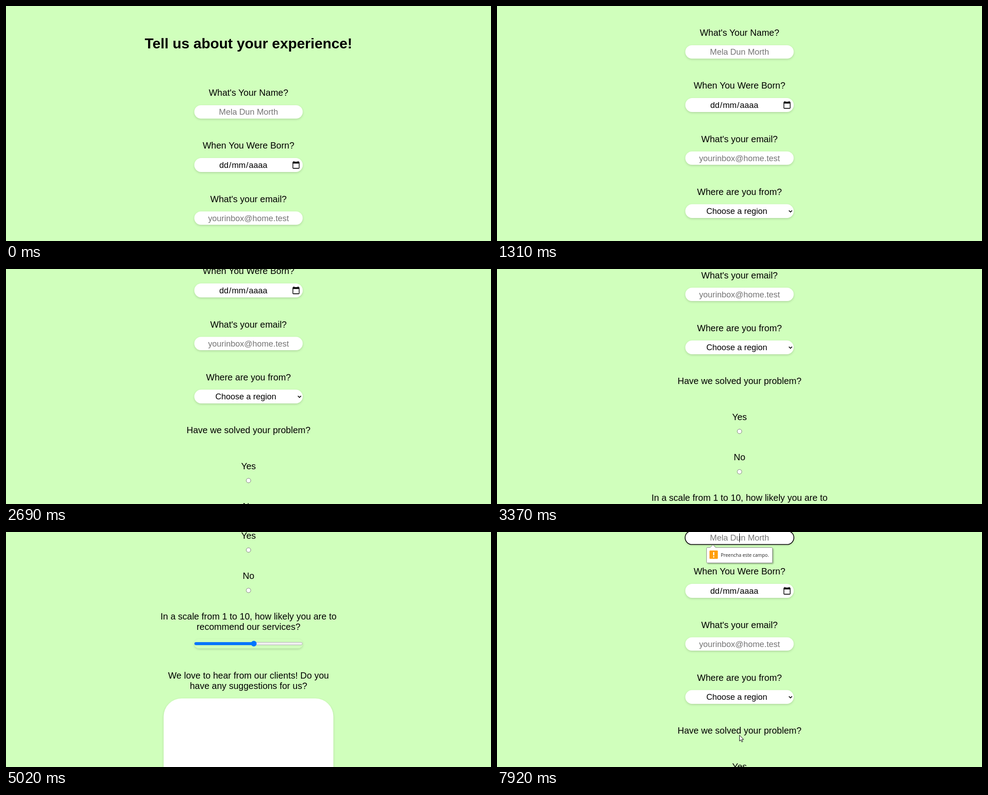
Recreate the animation shown at these times as an HTML page. Size 1075 px wide and 521 px high, loop 7.99 s.

```html
<!DOCTYPE html>
<html lang="en">
<head>
<meta charset="utf-8">
<title>Feedback form</title>
<style>
  html, body { margin: 0; width: 100%; height: 100%; overflow: hidden; background: #d0ffbc; }
  svg { display: block; width: 100vw; height: 100vh; }
  text { font-family: "Liberation Sans", Arial, sans-serif; text-anchor: middle; }
  .title { font-size: 32px; font-weight: bold; }
  .label { font-size: 20px; }
  .value { font-size: 18.4px; }
  .hint { fill: #757575; }
  .box { fill: #fff; filter: url(#shadow); }
  .button { fill: #efefef; }
  .hollow { fill: #d0ffbc; }
  .radio { fill: #fff; stroke: #767676; }
  .tip { font: 10.4px "Open Sans", "Noto Sans", sans-serif; text-anchor: start; fill: #222; }
</style>
</head>
<body>
<svg viewBox="0 0 1075 521">
  <defs>
    <filter id="shadow" x="-10%" y="-50%" width="120%" height="200%">
      <feDropShadow dx="0" dy="2" stdDeviation="2.5" flood-opacity=".16"/>
    </filter>
    <filter id="tipShadow">
      <feDropShadow dx="2" dy="2" stdDeviation="1.5" flood-opacity=".3"/>
    </filter>
  </defs>
  <g id="page">
    <g id="form"></g>

    <!-- calendar icon, select chevron -->
    <path transform="translate(633.6 343) scale(.767)" d="M20 3h-1V1h-2v2H7V1H5v2H4c-1.1 0-2 .9-2 2v16c0 1.1.9 2 2 2h16c1.1 0 2-.9 2-2V5c0-1.1-.9-2-2-2zm0 18H4V8h16v13z"/>
    <path d="M647 586.3l3.5 3.5 3.5-3.5" fill="none" stroke="#000" stroke-width="1.7"/>

    <!-- slider -->
    <rect x="418" y="978.5" width="239" height="6" rx="3" fill="#efefef" stroke="#b2b2b2"/>
    <path d="M421 981.5H549" stroke="#0075ff" stroke-width="6.6" stroke-linecap="round"/>
    <circle cx="549.3" cy="981.5" r="6.2" fill="#0075ff"/>

    <!-- resize grip -->
    <path d="M717.5 1317.5l7-7M721.5 1317.5l3-3" stroke="#777"/>

    <g id="focus">
      <rect x="417" y="219.5" width="241" height="30.2" rx="15.1" fill="none" stroke="#101010" stroke-width="1.8"/>
      <path d="M537.5 225v20" stroke="#000"/>
    </g>
    <g id="tooltip">
      <path d="M466 256.5h6.5l6-6 6 6h124q2 0 2 2v30q0 2-2 2h-142q-2 0-2-2v-30q0-2 2-2z" fill="#fff" stroke="#8a8a8a" filter="url(#tipShadow)"/>
      <rect x="471" y="263" width="18.5" height="18.5" rx="1.5" fill="#ff9f0a"/>
      <path d="M480.3 266.5v7.2M480.3 275.8v2.6" stroke="#fff" stroke-width="2.6"/>
      <text class="tip" x="496" y="277">Preencha este campo.</text>
    </g>
  </g>
  <path id="cursor" d="M.5.5V13.5L3.5 10.7 5.6 15.5 7.7 14.6 5.6 10H9.7Z" fill="#fff" stroke="#000"/>
</svg>
<script>
const LOOP = 7990, MID = 537.5, SUBMIT = 7640;
const $ = id => document.getElementById(id);

const text = (kind, y, content, x = MID) =>
  `<text class="${kind}" x="${x}" y="${y}">${content}</text>`;
const box = (y, h, kind = "", w = 240, r = h / 2) =>
  `<rect class="box ${kind}" x="${MID - w / 2}" y="${y}" width="${w}" height="${h}" rx="${r}"/>`;
const radio = (y, name) =>
  text("label", y, name) + `<circle class="radio" cx="${MID}" cy="${y + 25.5}" r="5"/>`;

$("form").innerHTML = [
  text("title", 93.5, "Tell us about your experience!"),
  text("label", 199, "What's Your Name?"),
  box(220, 29.6), text("value hint", 241, "Mela Dun Morth"),
  text("label", 316, "When You Were Born?"),
  box(337, 31),
  text("value", 359, 'dd<tspan dx="1">/</tspan><tspan dx="1">mm</tspan><tspan dx="1">/</tspan><tspan dx="1">aaaa</tspan>', 526),
  text("label", 434.5, "What's your email?"),
  box(455.5, 29.6), text("value hint", 476.5, "yourinbox@home.test"),
  text("label", 551.5, "Where are you from?"),
  box(572.5, 30.5), text("value", 594, "Choose a region", 531.5),
  text("label", 669, "Have we solved your problem?"),
  radio(748.5, "Yes"),
  radio(838, "No"),
  text("label", 927.5, "In a scale from 1 to 10, how likely you are to"),
  text("label", 950.5, "recommend our services?"),
  box(971.5, 20.5, "hollow"),
  text("label", 1059, "We love to hear from our clients! Do you"),
  text("label", 1082.3, "have any suggestions for us?"),
  box(1103, 215.8, "", 376, 40),
  box(1358.7, 29.8, "button"), text("value", 1380, "Send")
].join("");

// Smooth monotone curve through [position, value] points.
function curve(points) {
  const slopes = points.slice(1).map(([x, y], i) => (y - points[i][1]) / (x - points[i][0]));
  const tangent = i => {
    const a = slopes[i - 1] ?? slopes[i], b = slopes[i] ?? a;
    return a * b > 0 ? 2 * a * b / (a + b) : 0;
  };
  return x => {
    if (x <= points[0][0]) return points[0][1];
    const i = points.findIndex(p => p[0] >= x) - 1;
    if (i < 0) return points.at(-1)[1];
    const [x0, y0] = points[i], [x1, y1] = points[i + 1];
    const d = x1 - x0, u = (x - x0) / d, v = 1 - u;
    return y0 * v * v * (1 + 2 * u) + y1 * u * u * (3 - 2 * u)
      + d * u * v * (tangent(i) * v - tangent(i + 1) * u);
  };
}

const scrollAt = curve([[0, 0], [19, 133], [39, 305], [58, 524], [73, 734], [84, 911], [85, 925], [86, 929]]);
const cursorX = curve([[6200, 1058], [6550, 673], [6970, 557], [7600, 537], [LOOP, 537]]);
const cursorY = curve([[6200, 502], [6550, 495], [6970, 459], [7600, 450], [LOOP, 450]]);

function draw(t) {
  const submitted = t >= SUBMIT;
  const step = Math.max(0, Math.floor((t - 70) / 68.55) + 1);
  const scroll = submitted ? 222 : Math.round(scrollAt(step));
  $("page").setAttribute("transform", `translate(0 ${-scroll})`);

  const moved = 6200 + Math.floor((t - 6200) / 70) * 70;
  $("cursor").setAttribute("transform", `translate(${Math.round(cursorX(moved))} ${Math.round(cursorY(moved))})`);
  $("cursor").style.opacity = t >= 6200 ? 1 : 0;
  $("focus").style.opacity = submitted ? 1 : 0;
  $("tooltip").style.opacity = Math.min(1, Math.max(0, (t - 7740) / 180));
}

const start = performance.now();
function tick() {
  draw((performance.now() - start) % LOOP);
  requestAnimationFrame(tick);
}
tick();
</script>
</body>
</html>
```
